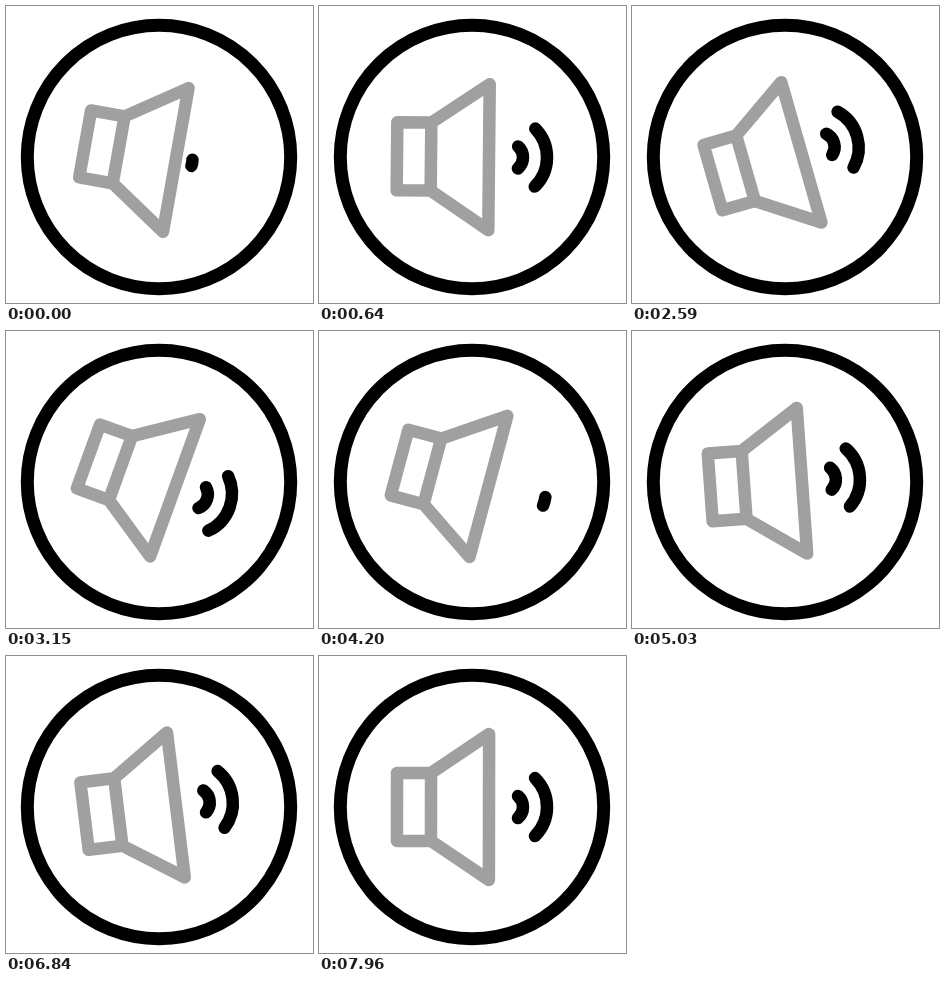
Animation, 307 px wide and 297 px high, one loop 8 s. Source, as an HTML page:

```html
<!DOCTYPE html>
<html lang="en">
<head>
<meta charset="utf-8">
<title>Speaker</title>
<style>
  html, body { margin: 0; width: 100%; height: 100%; overflow: hidden; background: #fff; }
  svg { display: block; width: 307px; height: 297px; }
  path, circle { fill: none; stroke: #000; stroke-width: 12.5; stroke-linecap: round; stroke-linejoin: round; }
  .speaker { stroke: #a0a0a0; }
</style>
</head>
<body>
<svg viewBox="0 0 307 297">
  <circle cx="153" cy="151" r="131.7" style="stroke-width:13"/>
  <g id="icon">
    <path class="speaker" d="M112 117H78V185H112ZL170 78V224L112 185"/>
    <path id="inner" pathLength="1" d="M199 140A14.6 14.6 0 0 1 199 162"/>
    <path id="outer" pathLength="1" d="M216 122A41 41 0 0 1 216 180"/>
  </g>
</svg>
<script>
  const LOOP = 8000, CYCLE = 2230, START = 595, STEP = 70, HOLD = 69.75;
  const icon = document.getElementById('icon');
  const waves = [
    { el: document.getElementById('inner'), out: [0, 215], back: [570, 760] },
    { el: document.getElementById('outer'), out: [130, 400], back: [620, 790] }
  ];
  // [time in cycle, degrees]
  const swing = [[0, 0], [195, 0], [405, 20], [945, -16], [1535, 20], [1900, 0], [CYCLE, 0]];

  const part = (p, [a, b]) => Math.min(1, Math.max(0, (p - a) / (b - a)));
  const sine = u => (1 - Math.cos(Math.PI * u)) / 2;
  const easeOut = u => 1 - (1 - u) ** 2;

  function angle(p) {
    const i = swing.findIndex(k => k[0] > p);
    const [a, from] = swing[i - 1], [b, to] = swing[i];
    return from + (to - from) * sine(part(p, [a, b]));
  }

  function drawWave({ el, out, back }, p) {
    const returning = p >= back[0];
    const u = part(p, returning ? back : out);
    const len = returning ? easeOut(u) : 1 - sine(u);
    const shift = returning ? -18 * (1 - sine(u)) : 0;
    el.style.visibility = len > 0.001 ? 'visible' : 'hidden';
    el.setAttribute('stroke-dasharray', len > 0.999 ? 'none' : `${len} 2`);
    el.setAttribute('stroke-dashoffset', -(1 - len) / 2);
    el.setAttribute('transform', `translate(${shift} 0)`);
  }

  function draw(now) {
    const t = Math.floor((now % LOOP) / HOLD) * STEP;
    const p = (t + START) % CYCLE;
    icon.setAttribute('transform', `rotate(${angle(p)} 153 151)`);
    waves.forEach(w => drawWave(w, p));
  }

  let first;
  function tick(now) {
    first ??= now;
    draw(now - first);
    requestAnimationFrame(tick);
  }
  draw(0);
  requestAnimationFrame(tick);
</script>
</body>
</html>
```
